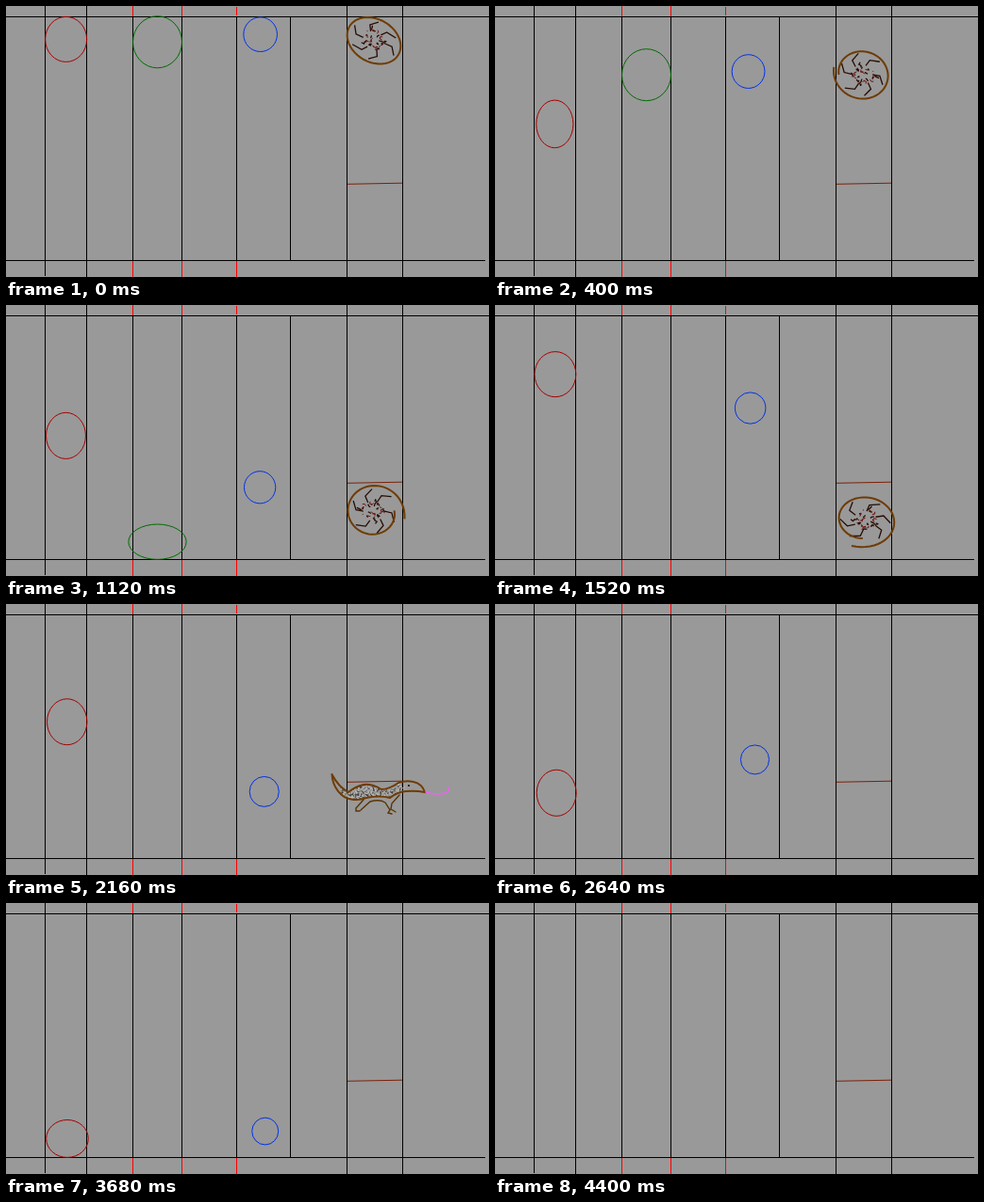
An HTML page that plays this animation: 512x288 px, repeating every 4.8 s.

```html
<!DOCTYPE html>
<html lang="en">
<head>
<meta charset="utf-8">
<title>Bouncing balls</title>
<style>
  html, body { margin: 0; width: 100%; height: 100%; overflow: hidden; background: #999; }
  svg { display: block; width: 512px; height: 288px; }
  path, ellipse { fill: none; vector-effect: non-scaling-stroke; }
  .thin { shape-rendering: crispEdges; }
</style>
</head>
<body>
<svg viewBox="0 0 512 288">
  <clipPath id="bodyClip"><use href="#body"/></clipPath>
  <rect width="512" height="288" fill="#999"/>
  <g class="thin">
    <path stroke="#000" d="M0 11.5H512M0 270.5H508M41.5 0V287M85.5 0V288M361.5 0V288M420.5 0V288M134.5 11V271M186.5 11V271M244.5 11V271M301.5 11V271"/>
    <path stroke="#f00" d="M134.5 0V11M186.5 0V11M244.5 1V10M134.5 271V288M186.5 271V288M244.5 271V288"/>
  </g>
  <path stroke="#7c2008" d="M362 189.3L420 188.2"/>
  <g id="balls"></g>
  <g id="roll">
    <path id="rollScales" stroke="#260c04" stroke-width="1.3"/>
    <path id="rollFlecks" stroke="#6b1410"/>
    <path id="shell" stroke="#6e3c04" stroke-width="2"/>
  </g>
  <g id="animal" stroke-linecap="round">
    <g clip-path="url(#bodyClip)">
      <path id="hideDark" stroke="#3a3a3a" stroke-width=".9"/>
      <path id="hideLight" stroke="#c4c0bc" stroke-width=".8"/>
    </g>
    <path id="body" stroke="#6e3c04" stroke-width="2" d="M345.5 181C346 194 355 206 366 207.5Q374 209 382 206Q396 203 407 206Q414 200 424 199Q434 198 444 200Q441 191 432 189Q424 187 416 190Q406 197 398 197Q388 191 379 192Q370 194 363 200Q352 194 345.5 181"/>
    <path stroke="#5a3408" stroke-width="1.4" d="M379 208L371 217L371 220L375 220M376 219L386 210Q396 207 402 211L407 219L405 222L409 223M417 203L409 212L408 218L413 221"/>
    <circle cx="427" cy="193" r="1.1" fill="#201000"/>
    <path id="tongue" stroke="#f060f0" stroke-width="1.5"/>
  </g>
</svg>
<script>
const STEP = 80, LOOP = 4800, LAST = 55, FLOOR = 270.4;
const UNROLL = 23, LEAVE = 30, SHELL_RADIUS = 25;
const $ = id => document.getElementById(id);
const clamp = (v, low, high) => Math.max(low, Math.min(high, v));
const show = (el, on) => el.setAttribute('visibility', on ? 'visible' : 'hidden');

// Arcs are [peak step, peak height, gravity]; their lower envelope is a bounce.
const bounce = (arcs, n) => Math.min(...arcs.map(([p, h, g]) => h + g * (n - p) ** 2));

// sway: sideways drift; shrink: radius lost per step; stretch: lengthening with speed.
const balls = [
  { color: '#a80000', x: 64.3, sway: 1, rx: 22, ry: 24, shrink: 0, stretch: .11, end: 55,
    arcs: [[0, 35.4, 3.6], [20.85, 68.5, 1.5], [38.5, 143, 1.91], [49.5, 225, 2.3]] },
  { color: '#006c00', x: 160.5, sway: 0, rx: 26, ry: 27.5, shrink: 0, stretch: 0, end: 15,
    arcs: [[0, 38.3, 1.395]] },
  { color: '#0030e8', x: 272.2, sway: 3.8, rx: 17.8, ry: 18.3, shrink: .083, stretch: 0, end: 53,
    arcs: [[0, 30.2, 1.575], [20.4, 105.3, 2.16], [36.9, 133, 2.13], [47.3, 239, 2.1]] }
];
for (const ball of balls) {
  ball.el = document.createElementNS('http://www.w3.org/2000/svg', 'ellipse');
  ball.el.setAttribute('stroke', ball.color);
  $('balls').append(ball.el);
}

function drawBall(ball, n) {
  const size = 1 - ball.shrink * n / ball.rx;
  const speed = (bounce(ball.arcs, n + .1) - bounce(ball.arcs, n - .1)) / .2;
  const pull = ball.stretch * Math.min(1, (speed / 32) ** 2);
  const full = ball.ry * size * (1 + pull / 2);
  const cy = Math.min(bounce(ball.arcs, n), FLOOR - full * .68);
  const ry = Math.min(full, FLOOR - cy);
  const rx = ball.rx * size * (1 - pull) + .06 * (full - ry) ** 2;
  const cx = ball.x - ball.sway * Math.cos((n - 8) * Math.PI / 30);
  Object.entries({ cx, cy, rx, ry }).forEach(([k, v]) => ball.el.setAttribute(k, v));
  show(ball.el, n < ball.end);
}

let seed = 7;
const random = () => (seed = seed * 16807 % 2147483647) / 2147483647;
const jitter = size => (random() - .5) * size;
const polar = (r, deg) => [r * Math.cos(deg * Math.PI / 180), r * Math.sin(deg * Math.PI / 180)];
const dash = (x, y, size) =>
  `M${x} ${y}l${jitter(size)} ${jitter(size)}l${jitter(size)} ${jitter(size)}`;

function buildTextures() {
  let scales = '', flecks = '', dark = '', light = '';
  for (let i = 0; i < 6; i++) {
    const a = 215 + i * 60 + random() * 12;
    scales += `M${polar(10, a - 5)}L${polar(17, a)}L${polar(22, a + 24)}`;
  }
  for (let i = 0; i < 28; i++) {
    const [x, y] = polar(2 + random() * 10, i * 67);
    if (i % 2) scales += dash(x, y, 5); else flecks += dash(x, y, 5);
  }
  for (let x = 354; x < 420; x += 2) {
    for (let y = 189; y < 209; y += 3) {
      dark += dash(x + random(), y + random(), 5);
      light += dash(x + random() * 2, y + random(), 4);
    }
  }
  $('rollScales').setAttribute('d', scales);
  $('rollFlecks').setAttribute('d', flecks);
  $('hideDark').setAttribute('d', dark);
  $('hideLight').setAttribute('d', light);
}

// A closed ring that loosens into a spiral: the free end lifts, the inner end tucks in.
function spiral(loose) {
  const points = [];
  for (let u = 0; u <= 1; u += 1 / 48) {
    const r = 1 + loose * (.2 * (1 - u) ** 8 - .25 * u ** 4);
    points.push(polar(SHELL_RADIUS * r, -65 - 385 * u));
  }
  return `M${points.join('L')}`;
}

// Rolling shell poses: step, x, half width, half height, tilt.
const poses = [[0, 390, 30, 22.8, 30], [10, 388, 26, 28, 0], [19, 392.5, 30.5, 25, 8]];

function poseAt(n) {
  const i = n < poses[1][0] ? 0 : 1;
  const [a, b] = [poses[i], poses[i + 1]];
  const u = Math.min(1, (n - a[0]) / (b[0] - a[0]));
  return a.map((v, k) => v + (b[k] - v) * u);
}

function drawRoll(n) {
  const [, x, rx, ry, tilt] = poseAt(n);
  const y = Math.min(bounce([[0, 36.8, 1.44], [16, 211, 2]], n), 241);
  const turn = (n - 10) * 20;
  $('roll').setAttribute('transform', `translate(${x} ${y}) rotate(${tilt}) ` +
    `scale(${rx / SHELL_RADIUS} ${ry / SHELL_RADIUS}) rotate(${turn - tilt})`);
  $('shell').setAttribute('d', spiral(Math.min(1, n / 10)));
  show($('roll'), n < UNROLL);
}

function drawAnimal(n) {
  const reach = 25 * clamp(Math.min((n - 24) / 2, (29 - n) / 2), 0, 1);
  const tip = reach > 20 ? `Q${445 + reach} 200 ${444 + reach} 195` : '';
  $('tongue').setAttribute('d', reach ? `M445 200Q${445 + reach * .5} 203.5 ${445 + reach * .8} 201${tip}` : '');
  show($('animal'), n >= UNROLL && n < LEAVE);
}

function draw(time) {
  const n = Math.min(LAST, Math.floor(time % LOOP / STEP));
  balls.forEach(ball => drawBall(ball, n));
  drawRoll(n);
  drawAnimal(n);
}

buildTextures();
const start = performance.now();
function tick() {
  draw(performance.now() - start);
  requestAnimationFrame(tick);
}
tick();
</script>
</body>
</html>
```
